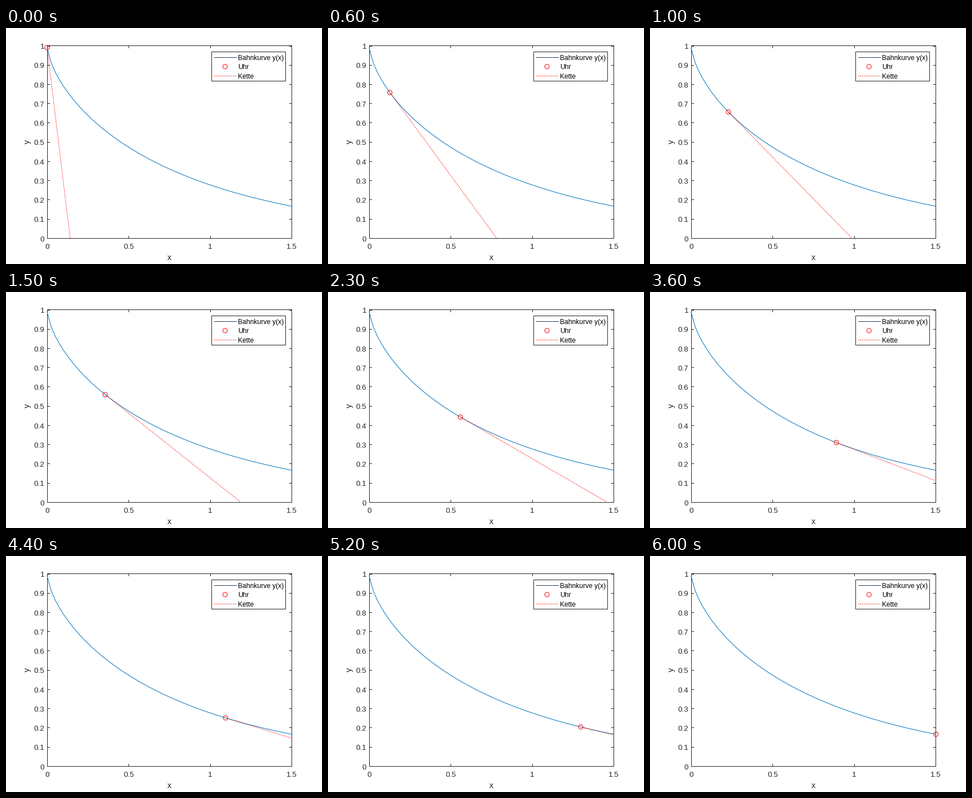
Recreate the animation shown at these times as a matplotlib script. Size 560 px wide and 420 px high, loop 6100 ms.

```python
import numpy as np
import matplotlib.pyplot as plt
from matplotlib.animation import FuncAnimation
from matplotlib.patches import Circle, Rectangle

W, H, DPI = 560, 420, 100
X0, X1, Y0, Y1 = 72.8, 506.8, 373.8, 31.5            # data area
LEFT, RIGHT, TOP, BOTTOM = 73.5, 506.5, 31.5, 374.5  # drawn box
X_MAX, Y_START, POINTS = 1.5, 0.99, 60
INK, BLUE, NAVY, RED = "#262626", "#0072BD", "#23405A", "#FF0000"
DOTS = (0, (1.6, 1.7))
PT = 72 / DPI  # points per pixel

plt.rcParams["font.family"] = "Liberation Sans"


def px(x):
    return X0 + x / X_MAX * (X1 - X0)


def py(y):
    return Y0 + y * (Y1 - Y0)


def crisp(v, low, high):
    """Centre of the nearest pixel, kept inside the box."""
    return min(max(round(v) + 0.5, low), high)


# Tractrix of a chain of length 1: x = t - tanh t, y = 1 / cosh t
t_start = np.arccosh(1 / Y_START)
shift = t_start - np.tanh(t_start)
xs = np.linspace(0, X_MAX, POINTS)
ts = xs + 1.0
for _ in range(60):
    ts = ts - (ts - np.tanh(ts) - shift - xs) / np.tanh(ts) ** 2
ys = 1 / np.cosh(ts)
feet = ts - shift

fig = plt.figure(figsize=(W / DPI, H / DPI), dpi=DPI, facecolor="white")
ax = fig.add_axes([0, 0, 1, 1])
ax.set_xlim(0, W)
ax.set_ylim(H, 0)
ax.axis("off")


def line(x, y, color, **kw):
    return ax.plot(x, y, color=color, lw=PT, snap=False,
                   solid_capstyle="butt", dash_capstyle="butt", **kw)[0]


def label(x, y, text, size, color=INK, **kw):
    ax.text(x, y, text, fontsize=size * PT, color=color, **kw)


def ring(x, y, z):
    return ax.add_patch(Circle((x, y), 4, fill=False, ec=RED, lw=PT,
                               snap=False, zorder=z))


def frame_box(x0, y0, x1, y1, face, z):
    ax.add_patch(Rectangle((x0, y0), x1 - x0, y1 - y0, fc=face, ec=INK,
                           lw=PT, joinstyle="miter", snap=False, zorder=z))


# Axes box, ticks and labels
frame_box(LEFT, TOP, RIGHT, BOTTOM, "none", 1)
for v in (0, 0.5, 1, 1.5):
    x = crisp(px(v), LEFT, RIGHT)
    line([x, x], [BOTTOM, BOTTOM - 4.5], INK, zorder=1)
    line([x, x], [TOP, TOP + 4.5], INK, zorder=1)
    label(px(v), 393, f"{v:g}", 13.33, ha="center", va="baseline")
for k in range(11):
    y = crisp(py(k / 10), TOP, BOTTOM)
    line([LEFT, LEFT + 4.5], [y, y], INK, zorder=1)
    line([RIGHT, RIGHT - 4.5], [y, y], INK, zorder=1)
    label(68, py(k / 10) + 5.7, f"{k / 10:g}", 13.33,
          ha="right", va="baseline")
label(290, 413, "x", 14.67, ha="center", va="baseline")
label(38, 202.5, "y", 14.67, ha="center", va="center", rotation=90)

# Curve and moving parts
line(px(xs), py(ys), BLUE, zorder=2)
watch = ring(px(0), py(Y_START), 4)
chain = line([], [], RED, ls=DOTS, zorder=3)

# Legend
frame_box(364.5, 42.5, 495.5, 94.5, "white", 5)
line([369, 409], [52.5, 52.5], NAVY, zorder=6)
ring(388.2, 68.7, 6)
line([369, 409], [85.5, 85.5], RED, ls=DOTS, zorder=6)
for y, text in ((57, "Bahnkurve y(x)"), (73, "Uhr"), (90, "Kette")):
    label(411, y, text, 12, "black", ha="left", va="baseline", zorder=6)


def update(i):
    k = i if i < 2 else i - 1  # the second position is held twice
    x, y, foot = xs[k], ys[k], feet[k]
    end = min(foot, X_MAX)
    y_end = y * (foot - end) / (foot - x)
    watch.center = px(x), py(y)
    chain.set_data([px(x), px(end)], [py(y), py(y_end)])
    return watch, chain


anim = FuncAnimation(fig, update, frames=POINTS + 1, interval=100,
                     repeat=True, repeat_delay=0, blit=False)
plt.show()
```
